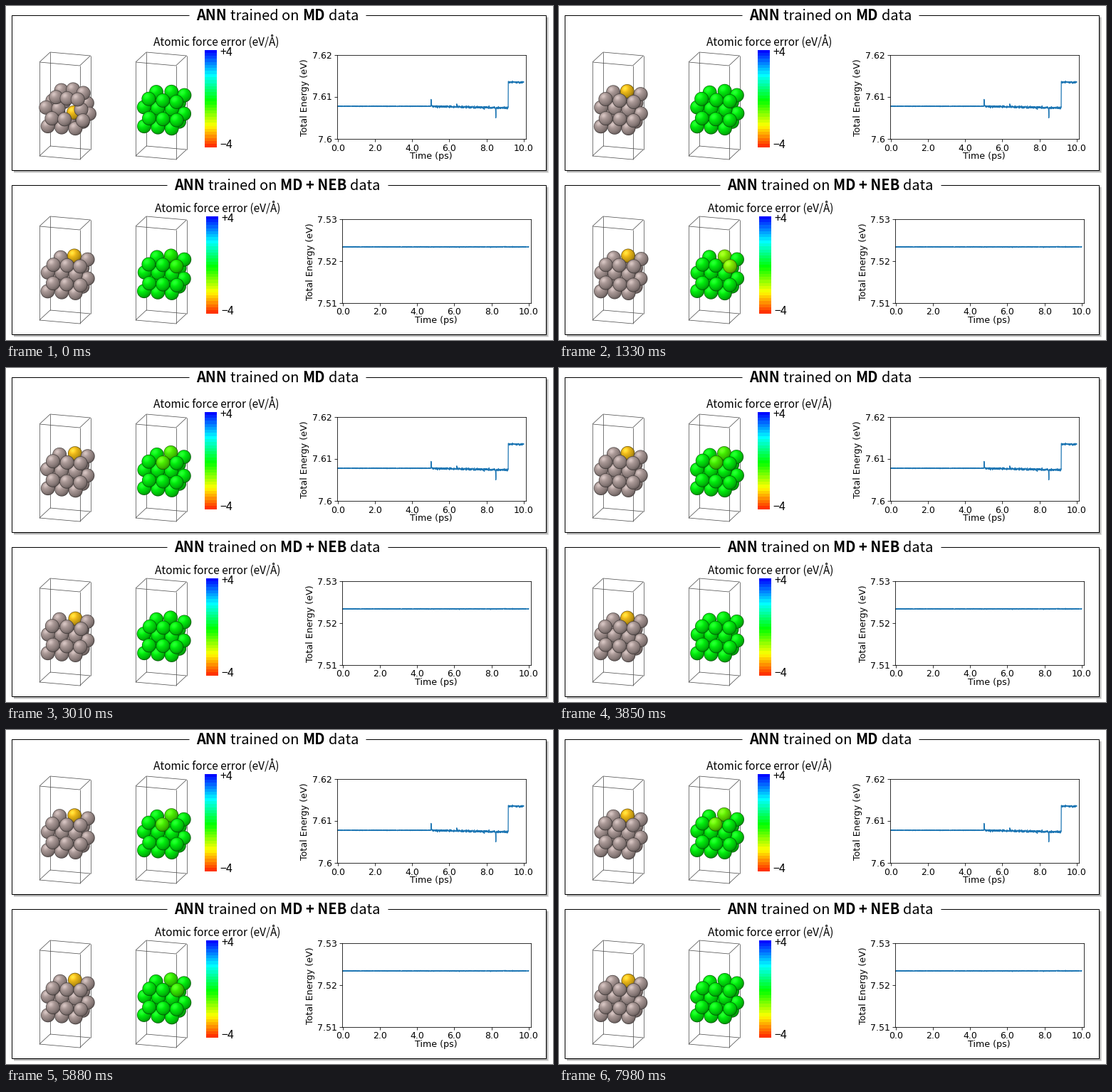
Write a matplotlib script that moves like this. It is 768 by 470 pixels and loops after 8000 ms.

```python
import colorsys
import math
import random

import matplotlib.pyplot as plt
import numpy as np
from matplotlib.animation import FuncAnimation
from matplotlib.patches import Rectangle

W, H, DPI = 768, 470, 100
PX = 72 / DPI
LOOP, TICK, STEP = 8000, 50, 70
DROP = 231  # distance between the two rows of slabs
SANS = "Noto Sans CJK JP"
PLOT = "DejaVu Sans"

fig = plt.figure(figsize=(W / DPI, H / DPI), dpi=DPI, facecolor="white")
stage = fig.add_axes([0, 0, 1, 1])
stage.set_xlim(0, W)
stage.set_ylim(H, 0)
stage.axis("off")


def line(xs, ys, color="black", width=1.0):
    stage.plot(xs, ys, color=color, lw=width * PX, zorder=3,
               solid_capstyle="butt", solid_joinstyle="miter")


def label(x, y, text, size, font=SANS, **kw):
    kw.setdefault("va", "baseline")
    return stage.text(x, y, text, fontsize=size * PX, family=font, zorder=6, **kw)


# ---------- panels, titles, colour bars ----------

def title(x, y, parts):
    """Bold and plain parts in turn; returns the right end."""
    for i, text in enumerate(parts):
        t = label(x, y, text, 20, weight="normal" if i % 2 else "bold")
        x = t.get_window_extent().x1 + 5
    return x - 5


def panel(top, bottom, title_x, parts):
    left, right = 7.5, 757.5
    for k in range(5):
        stage.add_patch(Rectangle((left + 3, top + 3), right - left - 3 + k,
                                  bottom - top - 3 + k,
                                  fc="black", alpha=0.13, lw=0, zorder=1))
    stage.add_patch(Rectangle((left, top), right - left, bottom - top,
                              fc="white", lw=0, zorder=2))
    end = title(title_x, top + 7.5, parts)
    line([title_x - 10, left, left, right, right, end + 10],
         [top, top, bottom, bottom, top, top])


def color_bar(x, y, w=17, h=137, bands=32):
    for i in range(bands):
        rgb = colorsys.hsv_to_rgb((238 - 226 * i / (bands - 1)) / 360, 1, 1)
        stage.add_patch(Rectangle((x, y + h * i / bands), w, h / bands + 0.3,
                                  fc=rgb, lw=0, zorder=4))
    label(x + w + 4.5, y + 9, "+4", 16, weight=500)
    label(x + w + 4.5, y + h + 1, "\u22124", 16, weight=500)


panel(12.5, 230.5, 267, ["ANN", "trained on", "MD", "data"])
panel(251.5, 461.5, 236, ["ANN", "trained on", "MD + NEB", "data"])
for x, y in ((207, 55.5), (209, 289.5)):
    label(x, y, "Atomic force error (eV/Å)", 15.45, weight=500)
    color_bar(x + 71.5, y + 6)


# ---------- energy plots ----------

def energy_plot(left, top, low, ticks, t, e):
    w, h = 265, 118
    ax = fig.add_axes([left / W, 1 - (top + h) / H, w / W, h / H], facecolor="none")
    ax.plot(t, e, color="#1f77b4", lw=1.25 * PX)
    ax.set_xlim(-0.05, 10.1)
    ax.set_ylim(low, low + 0.02)
    ax.set_xticks(range(0, 11, 2), [f"{v:.1f}" for v in range(0, 11, 2)])
    ax.set_yticks([low, low + 0.01, low + 0.02], ticks)
    ax.tick_params(length=4 * PX, width=0.8 * PX, pad=3 * PX, labelsize=12.5 * PX,
                   labelfontfamily=PLOT)
    for s in ax.spines.values():
        s.set_linewidth(0.8 * PX)
    label(left - 44.5, top + 60, "Total Energy (eV)", 12.6, PLOT,
          rotation=90, ha="center", va="center")
    label(left + 132.5, top + 143, "Time (ps)", 12.6, PLOT, ha="center", va="center")


rng = np.random.default_rng(4)
time = np.linspace(0, 10, 1400)
late = np.clip(time - 5, 0, None)
top_e = 7.6077 - 0.0001 * late + rng.normal(0, 1, time.size) * np.where(late > 0, 1.2e-4, 4e-5)
for at, size in [(5.02, 0.0018), (6.4, 0.0007), (8.5, -0.0026)]:
    top_e += size * np.exp(-((time - at) / 0.009) ** 2)
top_e[time > 9.17] += 0.0062
energy_plot(464.5, 68.5, 7.60, ["7.6", "7.61", "7.62"], time, top_e)
energy_plot(471.5, 299.5, 7.51, ["7.51", "7.52", "7.53"], time,
            7.5233 + rng.normal(0, 5e-5, time.size))


# ---------- simulation cells ----------

def cell(x, y):
    edges = np.array([(56.5, 5), (15, -14), (0, 132)])
    for i in range(3):
        for a in (0, 1):
            for b in (0, 1):
                p = np.array([x, y]) + a * edges[i - 1] + b * edges[i - 2]
                q = p + edges[i]
                line([p[0], q[0]], [p[1], q[1]], "#505050", 0.75)


for dx in (0, 135):
    for dy in (0, DROP):
        cell(47 + dx, 79 + dy)

# ---------- atoms: slab of 4 layers, 2 rows, 3 columns ----------

R = 9.9
X0, Y0, CW, CH = 36, 96, 236, 326
GRAY, GOLD = (0.68, 0.61, 0.60), (0.96, 0.75, 0.09)
ADATOM, SUNK = (3, 1, 1), (1, 1, 1)
SITES = [(l, r, c) for l in range(4) for r in range(2) for c in range(3)]
SWITCH = 1050  # the trajectory starts over here


def depth(site):
    l, r, _ = site
    return -(2 * r + (l % 2 == 0)), l


def place(site):
    l, r, c = site
    odd = l % 2
    x = 58.7 + 19.4 * c + 10.2 * r + 7 * odd
    y = 169.2 + 1.5 * c - 9.5 * r - 26.5 * (l // 2) - 11.3 * odd
    if site == ADATOM:
        x, y = x + 1.3, y - 3.5
    return x, y


def rebuild(site, x, y):
    """Top layer closes up, the layers below part around the sunk atom."""
    if site[0] == 3:
        return x - 0.2 * (x - 88), y - 2.5
    d = x - place(SUNK)[0]
    push = 0 if site == SUNK else math.copysign(9 * math.exp(-abs(d) / 25), d)
    return x + push * site[0] / 2, y


class Slab:
    def __init__(self, dx, dy, seed, bursts=None, partner=None, rebuilt=False):
        self.dx, self.dy, self.rebuilt = dx, dy, rebuilt
        self.partner = partner
        rnd = random.Random(seed)
        self.waves = {s: [(rnd.uniform(260, 700), rnd.uniform(0, math.tau)) for _ in range(4)]
                      for s in SITES}
        self.bursts = bursts
        if bursts:
            self.bursts = bursts + [(ms + rnd.uniform(-150, 150), rnd.uniform(5, 30))
                                    for ms in (700, 3000, 4500, 5900, 7300)]

    def position(self, site, t, broken):
        x, y = place(site)
        if broken:
            x, y = rebuild(site, x, y)
        swing = [math.sin(math.tau * t / p + f) for p, f in self.waves[site]]
        amp = 0.1 + 0.13 * site[0]
        return (x + self.dx + amp * (swing[0] + swing[1]),
                y + self.dy + amp * (swing[2] + swing[3]))

    def color(self, site, t, broken):
        if not self.bursts:
            return GOLD if site == (SUNK if broken else ADATOM) else GRAY
        shift = 0
        if site in (ADATOM, self.partner):
            shift = sum(size * math.exp(-((t - ms) / 110) ** 2) for ms, size in self.bursts)
        return colorsys.hsv_to_rgb((123 - min(shift, 80)) / 360, 1, 0.96)

    def draw(self, img, t):
        broken = self.rebuilt and t < SWITCH
        order = sorted(SITES, key=lambda s: (-1.5, 0) if broken and s == SUNK else depth(s))
        for s in order:
            ball(img, *self.position(s, t, broken), self.color(s, t, broken))


GY, GX = np.mgrid[0:24, 0:24] + 0.5


def ball(img, x, y, color):
    x, y = x - X0, y - Y0
    i, j = int(x) - 12, int(y) - 12
    nx, ny = (GX + i - x) / R, (GY + j - y) / R
    r2 = nx * nx + ny * ny
    edge = (1 - np.sqrt(r2)) * R
    alpha = np.clip(edge + 0.5, 0, 1)[..., None]
    light = np.clip(-0.32 * nx - 0.42 * ny + 0.85 * np.sqrt(np.clip(1 - r2, 0, 1)), 0, 1)
    shade = (0.62 + 0.38 * light) * (0.45 + 0.55 * np.clip(edge / 1.2, 0, 1))
    rgb = np.array(color) * shade[..., None] + 0.16 * (light ** 12)[..., None]
    part = img[j:j + 24, i:i + 24]
    old = part[..., 3:]
    out = alpha + old * (1 - alpha)
    part[..., :3] = (rgb * alpha + part[..., :3] * old * (1 - alpha)) / np.maximum(out, 1e-6)
    part[..., 3:] = out


slabs = [
    Slab(0, 0, 11, rebuilt=True),
    Slab(135.3, 0, 12, [(3850, 20), (7980, 28)], partner=(3, 0, 1)),
    Slab(0, DROP + 1, 13),
    Slab(135.3, DROP + 1, 14, [(0, 9), (1330, 36), (2240, 18), (6650, 74)],
         partner=(3, 0, 2)),
]

blank = np.zeros((CH, CW, 4))
atoms = fig.figimage(blank, X0, H - Y0 - CH, origin="upper", zorder=5)


def update(n):
    t = (n * TICK + 40) // STEP * STEP
    img = blank.copy()
    for slab in slabs:
        slab.draw(img, t)
    atoms.set_data((np.clip(img, 0, 1) * 255).round().astype(np.uint8))
    return [atoms]


anim = FuncAnimation(fig, update, frames=LOOP // TICK, interval=TICK,
                     init_func=lambda: update(0), repeat=True, repeat_delay=0)
plt.show()
```
